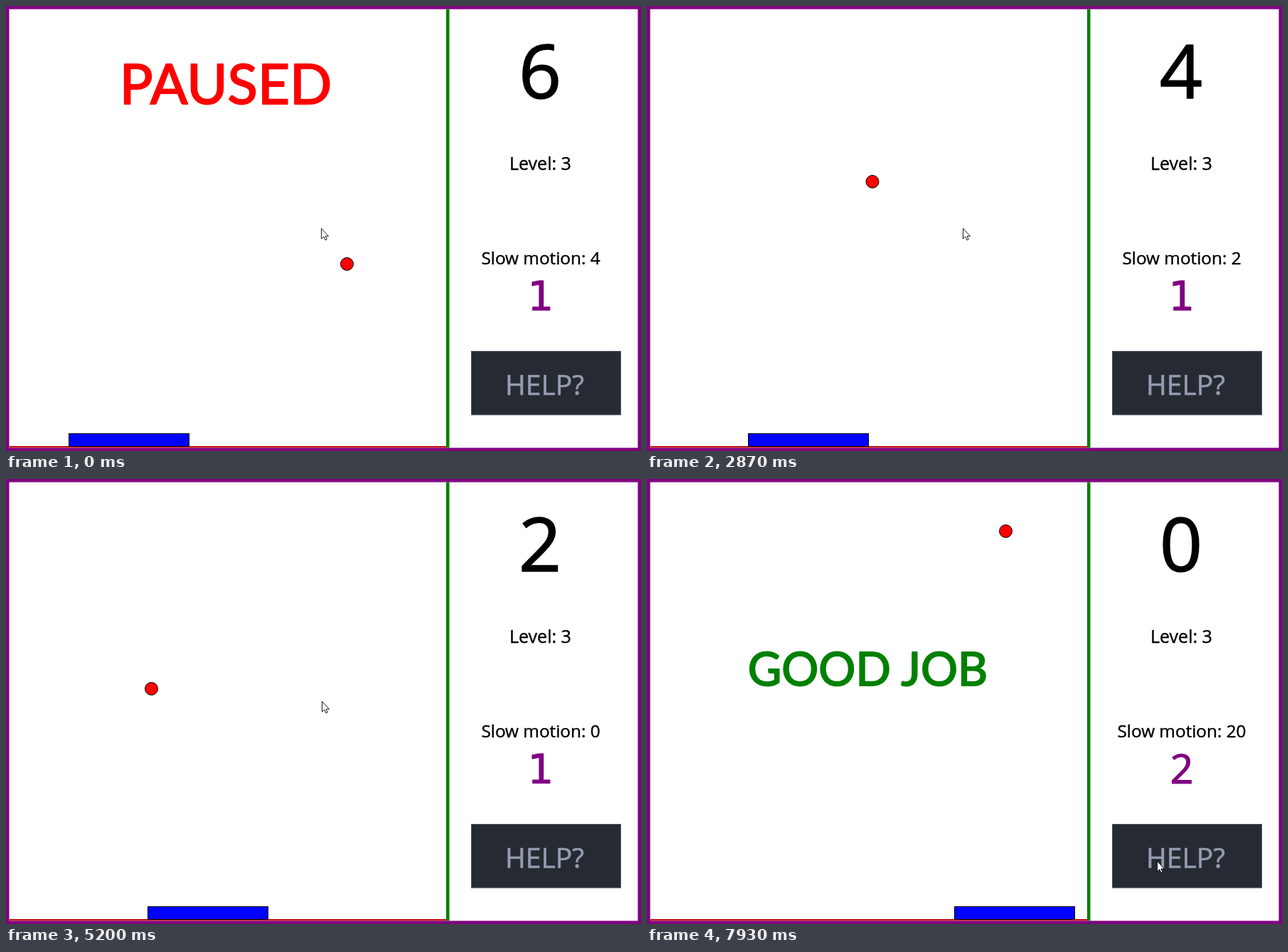
An HTML page that plays this animation: 893 px wide and 627 px high, repeating every 8 s.

```html
<!DOCTYPE html>
<html lang="en">
<head>
<meta charset="utf-8">
<title>Paddle game</title>
<style>
  html, body { margin: 0; width: 100%; height: 100%; overflow: hidden; background: #fff; }
  svg { display: block; width: 893px; height: 627px; }
  text {
    font-family: "Open Sans", "Noto Sans", sans-serif;
    text-anchor: middle;
    stroke-linejoin: round;
    white-space: pre;
  }
  .banner { font-family: Lato, sans-serif; stroke-width: 2; }
  .one { font-family: "DejaVu Sans", sans-serif; }
  #score { font-size: 105px; stroke: #000; stroke-width: 1.6; }
  #bonus { font-size: 57px; fill: #800080; stroke: #800080; stroke-width: 1.2; }
  #paused { font-size: 78px; fill: #f00; stroke: #f00; }
  #done { font-size: 65px; fill: #008000; stroke: #008000; }
  #help { font-size: 39px; fill: #969cb0; stroke: #969cb0; stroke-width: .6; }
  .label { font-size: 25px; stroke: #000; stroke-width: .4; }
  #slow { font-size: 24.3px; }
</style>
</head>
<body>
<svg viewBox="0 0 893 627">
  <rect width="893" height="627" fill="#800080"/>
  <rect x="4.5" y="4.5" width="884" height="618" fill="#fff"/>
  <rect x="4.5" y="620" width="615" height="2.5" fill="#c2161c"/>
  <rect x="619" y="4.5" width="4.5" height="618" fill="#008000"/>

  <text id="paused" class="banner" x="309" y="138">PAUSED</text>
  <text id="done" class="banner" x="310.5" y="291">GOOD JOB</text>
  <text id="score" x="751" y="130"></text>
  <text class="label" x="751.5" y="231">Level: 3</text>
  <text class="label" id="slow" x="752" y="364"></text>
  <text id="bonus" x="752" y="429"></text>

  <rect x="654.5" y="486.5" width="210" height="89.5" fill="#262a33" stroke="#4c5464"/>
  <text id="help" x="757.5" y="548">HELP?</text>

  <rect id="paddle" x=".5" y="602.5" width="169" height="18" fill="#00f" stroke="#000"/>
  <circle id="ball" r="9" fill="#f00" stroke="#000"/>
  <path id="cursor" d="M.5 .5V15L3.8 12 6 16.8 8.2 15.8 6.1 11.3H10.5Z" fill="#fff" stroke="#000" stroke-width=".9"/>
</svg>
<script>
const LOOP = 8000, TICK = 1000 / 15;
const START = 11, END = 97, RESUME = 103, SECOND = 15;
const RADIUS = 9.5, RIGHT = 619, FLOOR = 602, TOP = 4;
const el = id => document.getElementById(id);

// Distance the ball has covered along x and y, bounces unfolded: tick, dx, dy
const TRAVEL = [
  [10.5, 0, 0], [28, 225.5, 320.5], [43, 422.5, 584], [63, 691.5, 947],
  [78, 917, 1226], [89, 1092, 1431], [END, 1214.5, 1565], [END + 1, 1217, 1568]
];
// Paddle turning points: tick, x
const TURNS = [
  [10.5, 88], [16.4, 10], [34.8, 251], [53.3, 4], [62.5, 4],
  [78, 199], [95.7, 452], [END, 435], [END + 1, 432]
];

const clamp = (v, lo, hi) => Math.min(hi, Math.max(lo, v));
const mix = (a, b, p) => a + (b - a) * p;

function at(track, k) {
  const i = clamp(track.findIndex(row => row[0] >= k), 1, track.length - 1);
  const [a, b] = [track[i - 1], track[i]];
  const p = clamp((k - a[0]) / (b[0] - a[0]), 0, 1);
  return a.slice(1).map((v, j) => mix(v, b[j + 1], p));
}

// Reflect a free coordinate between two walls
function bounce(v, lo, hi) {
  const span = hi - lo, d = Math.abs(v - lo) % (2 * span);
  return lo + Math.min(d, 2 * span - d);
}

function ball(k) {
  const [dx, dy] = at(TRAVEL, k);
  return [
    bounce(479.5 + dx, TOP + RADIUS, RIGHT - RADIUS),
    bounce(363.5 - dy, TOP + RADIUS, FLOOR - RADIUS)
  ];
}

function cursor(k) {
  const p = clamp((k - 102) / 11, 0, 1), ease = p * p * (3 - 2 * p);
  const nudge = clamp((k - 117) / 2, 0, 1);
  return [
    (k < 5 ? 443 : mix(444, 722, ease)) - 5 * nudge,
    mix(313, 541, ease) - 3 * nudge
  ].map(Math.round);
}

const place = (id, x, y = 0) => el(id).setAttribute("transform", `translate(${x} ${y})`);
const show = (id, on) => el(id).setAttribute("visibility", on ? "visible" : "hidden");

function write(id, text) {
  const node = el(id);
  if (node.textContent === text) return;
  node.textContent = text;
  node.classList.toggle("one", text === "1");
}

function draw(t) {
  const k = Math.floor((t + 4) / TICK);
  // The game freezes at the end, then makes one last step
  const game = k < RESUME ? Math.min(k, END) : END + 1;
  const left = clamp(Math.ceil((END - k) / SECOND), 0, 6);
  place("ball", ...ball(game));
  place("paddle", Math.round(at(TURNS, game)[0]));
  place("cursor", ...cursor(k));
  show("paused", k < START);
  show("done", k >= END);
  write("score", String(left));
  write("slow", "Slow motion: " + (left > 1 ? left - 2 : 20));
  write("bonus", left > 1 ? "1" : "2");
}

const begin = performance.now();
function loop() {
  draw((performance.now() - begin) % LOOP);
  requestAnimationFrame(loop);
}
draw(0);
requestAnimationFrame(loop);
</script>
</body>
</html>
```
